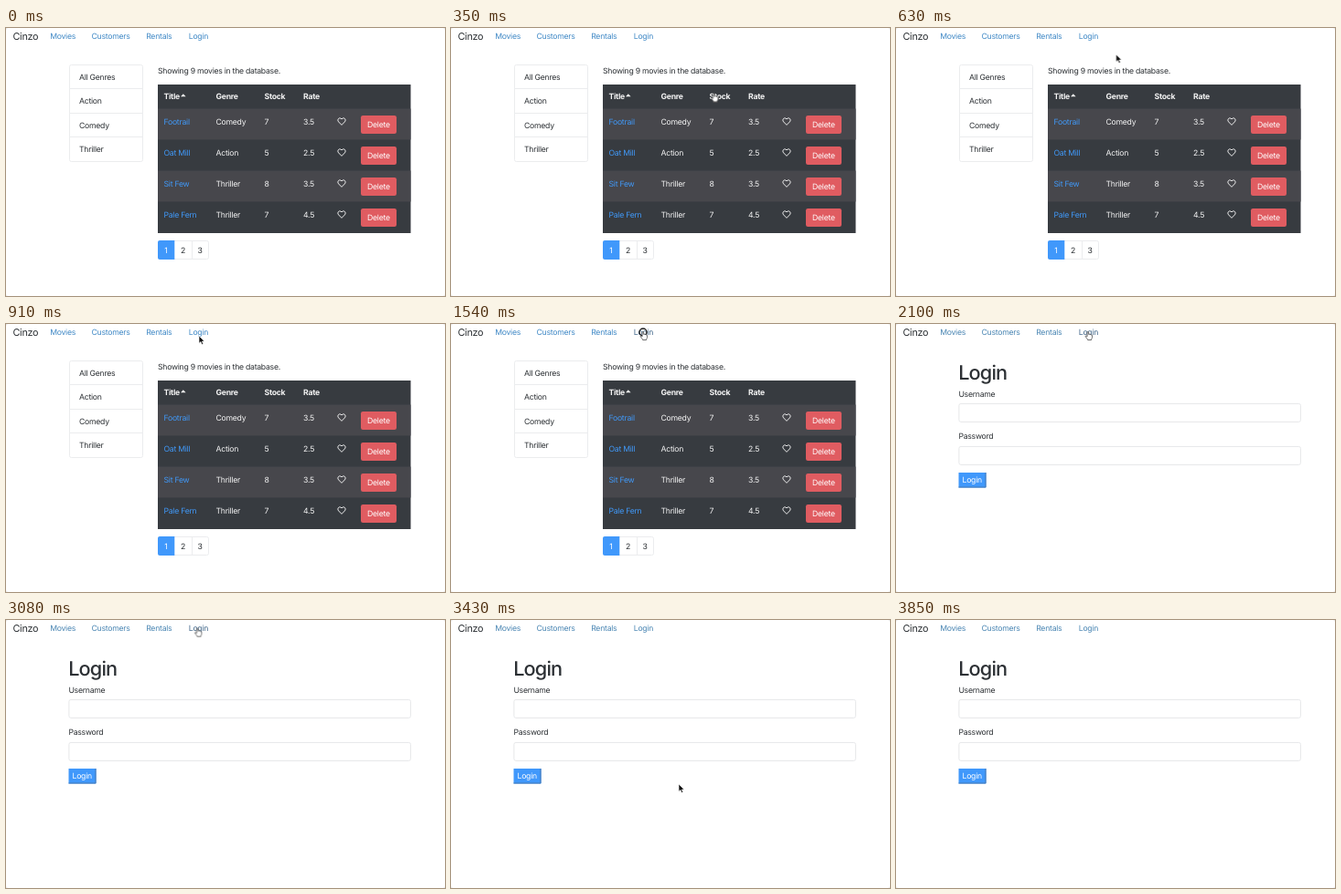
Write an HTML page that moves like this. It is 480x294 px and loops after 4.27 s.

```html
<!DOCTYPE html>
<html lang="en">
<head>
<meta charset="utf-8">
<title>Movie rental login</title>
<style>
  html, body { margin: 0; width: 100%; height: 100%; overflow: hidden; background: #e6e6e6; }
  svg { display: block; width: 480px; height: 294px; }
  text {
    font: 8.67px Inter, "Open Sans", sans-serif;
    letter-spacing: -.03em;
    text-rendering: geometricPrecision;
    fill: #2c3034;
  }
  .brand { font-size: 10.84px; }
  .mid { text-anchor: middle; }
  .table text { fill: #f4f4f4; }
  .table .title { fill: #4099f8; }
  .head text { font-weight: 700; }
  .line { fill: none; stroke: #ebecee; }
  .field { fill: #fff; stroke: #e6e7e9; }
  .h1 { font-size: 21.7px; font-weight: 450; letter-spacing: -.04em; }
  .white, .table .white { fill: #fff; }

  /* The picture advances in 61 ticks of 70 ms. */
  .home, .login, .link, .cursor, .hand, .arrow, .ring { animation: 4270ms step-end infinite; }
  .home { animation-name: home; }
  .login { animation-name: login; }
  .link { animation-name: link; }
  .hover { animation-name: hover; }
  .cursor { animation-name: move; }
  .hand { animation-name: hand; }
  .arrow { animation-name: arrow; }
  .ring { animation-name: ring; fill: none; stroke: #1c1c1c; stroke-width: 1.4; }

  @keyframes home { 0% { opacity: 1 } 49.18%, 100% { opacity: 0 } }
  @keyframes login { 0% { opacity: 0 } 49.18%, 100% { opacity: 1 } }
  @keyframes link { 0% { fill: #4089c6 } 49.18%, 100% { fill: #4a86b3 } }
  @keyframes hover {
    0% { fill: #4089c6 }
    29.508% { fill: #41678a }
    75.409%, 100% { fill: #4a86b3 }
  }
  @keyframes hand {
    0% { opacity: 0 }
    8.196% { opacity: 1 }
    9.836% { opacity: 0 }
    29.508% { opacity: 1 }
    75.409%, 100% { opacity: 0 }
  }
  @keyframes arrow {
    0% { opacity: 1 }
    8.196% { opacity: 0 }
    9.836% { opacity: 1 }
    29.508% { opacity: 0 }
    75.409%, 100% { opacity: 1 }
  }
  @keyframes ring {
    0% { opacity: 0; r: 4px }
    36.065% { opacity: 1; r: 4px; animation-timing-function: steps(7) }
    47.54% { opacity: 1; r: 16.4px }
    49.18%, 100% { opacity: 0; r: 16.4px }
  }
  @keyframes move {
    0% { transform: translate(302px, 400px) }
    1.639% { transform: translate(302px, 240px) }
    3.278% { transform: translate(298px, 188px) }
    4.918% { transform: translate(294px, 140px) }
    6.557% { transform: translate(290px, 100px) }
    8.196% { transform: translate(287.5px, 71.5px); animation-timing-function: steps(3) }
    13.114% { transform: translate(248px, 33px); animation-timing-function: steps(5) }
    21.311% { transform: translate(211px, 13px) }
    29.508% { transform: translate(211px, 10px) }
    31.147% { transform: translate(210px, 8px) }
    72.131% { transform: translate(209.4px, 8.6px) }
    73.77% { transform: translate(211px, 14px) }
    75.409% { transform: translate(215px, 30px) }
    77.049% { transform: translate(224px, 66px) }
    78.688% { transform: translate(236px, 118px) }
    80.327% { transform: translate(249px, 180px) }
    81.967% { transform: translate(260px, 236px) }
    83.606% { transform: translate(268px, 279px) }
    85.245% { transform: translate(271px, 283px) }
    86.885% { transform: translate(275px, 286px) }
    88.524% { transform: translate(281px, 290px) }
    90.163%, 100% { transform: translate(281px, 400px) }
  }
</style>
</head>
<body>
<svg viewBox="0 0 480 294">
  <defs>
    <g id="tools">
      <path d="M367 106.4 L363.6 102.9 C361.5 100.5 364.4 97.1 367 99.9 C369.6 97.1 372.5 100.5 370.4 102.9 Z"
        fill="none" stroke="#f4f4f4" stroke-width=".95" stroke-linejoin="round"/>
      <rect x="388" y="96" width="39" height="20" rx="2.2" fill="#e05c61"/>
      <text class="white mid" x="407.4" y="109.4">Delete</text>
    </g>
  </defs>

  <rect width="480" height="294" rx="2.5" fill="#fff"/>

  <text class="brand" x="7.5" y="12.5">Cinzo</text>
  <text class="link" x="48.2" y="12">Movies</text>
  <text class="link" x="93.5" y="12">Customers</text>
  <text class="link" x="153.2" y="12">Rentals</text>
  <text class="link hover" x="199.8" y="12">Login</text>

  <g class="home">
    <rect class="line" x="69.5" y="40.5" width="80" height="106" rx="2"/>
    <path class="line" d="M69.5 66.5h80M69.5 93.5h80M69.5 119.5h80"/>
    <text x="80" y="57">All Genres</text>
    <text x="80" y="83.4">Action</text>
    <text x="80" y="109.9">Comedy</text>
    <text x="80" y="136.3">Thriller</text>

    <text x="166" y="50">Showing 9 movies in the database.</text>

    <g class="table">
      <rect x="166" y="62" width="276.5" height="163" fill="#373b40"/>
      <path d="M166 88.5h276.5v34h-276.5zM166 156.5h276.5v34h-276.5z" fill="#47474c"/>
      <g class="head">
        <text x="172.5" y="78.4">Title</text>
        <path d="M191 75.2l2.8-3 2.8 3z" fill="#f4f4f4"/>
        <text x="229.5" y="78.4">Genre</text>
        <text x="282.5" y="78.4">Stock</text>
        <text x="325" y="78.4">Rate</text>
      </g>
      <g>
        <text class="title" x="172.5" y="105.5">Footrail</text>
        <text x="229.5" y="105.5">Comedy</text>
        <text x="282.5" y="105.5">7</text>
        <text x="325" y="105.5">3.5</text>
        <use href="#tools"/>
      </g>
      <g transform="translate(0 34)">
        <text class="title" x="172.5" y="105.5">Oat Mill</text>
        <text x="229.5" y="105.5">Action</text>
        <text x="282.5" y="105.5">5</text>
        <text x="325" y="105.5">2.5</text>
        <use href="#tools"/>
      </g>
      <g transform="translate(0 68)">
        <text class="title" x="172.5" y="105.5">Sit Few</text>
        <text x="229.5" y="105.5">Thriller</text>
        <text x="282.5" y="105.5">8</text>
        <text x="325" y="105.5">3.5</text>
        <use href="#tools"/>
      </g>
      <g transform="translate(0 102)">
        <text class="title" x="172.5" y="105.5">Pale Fern</text>
        <text x="229.5" y="105.5">Thriller</text>
        <text x="282.5" y="105.5">7</text>
        <text x="325" y="105.5">4.5</text>
        <use href="#tools"/>
      </g>
    </g>

    <rect class="line" x="166.5" y="233.5" width="55" height="20" rx="2"/>
    <path class="line" d="M203.5 233.5v20"/>
    <path d="M184.3 233v21h-16.2a2.1 2.1 0 0 1-2.1-2.1v-16.8a2.1 2.1 0 0 1 2.1-2.1z" fill="#4098fb"/>
    <text class="white mid" x="175" y="247">1</text>
    <text class="mid" x="193.5" y="247">2</text>
    <text class="mid" x="212" y="247">3</text>
  </g>

  <g class="login">
    <text class="h1" x="68.2" y="61.2">Login</text>
    <text x="68.4" y="80">Username</text>
    <rect class="field" x="68.9" y="87.4" width="373.5" height="20" rx="2"/>
    <text x="68.4" y="126.4">Password</text>
    <rect class="field" x="68.9" y="134.4" width="373.5" height="20" rx="2"/>
    <rect x="68.5" y="163" width="30" height="16.5" fill="#4098fb"/>
    <path d="M68.5 179h29.5v-16" fill="none" stroke="#4579b3"/>
    <text class="white mid" x="83.2" y="174.3">Login</text>
  </g>

  <circle class="ring" cx="210" cy="9" r="4"/>

  <g class="cursor">
    <path class="arrow" d="M0 0v8.2l1.9-1.7 1.3 3 1.5-.7-1.3-2.8h2.6z"
      fill="#111" stroke="#fff" stroke-width=".6"/>
    <path class="hand" d="M-.9 5.8V.9q.8-1.3 1.6 0v2.5q.8-.6 1.3.2.8-.5 1.3.3 1-.4 1.2.6v2.2q-.1 1.2-.9 2v.8H-.4q-.3-1.3-1.2-2.1l-1.2-1.7q0-1.1 1.1-.6z"
      fill="#fff" stroke="#333" stroke-width=".7" stroke-linejoin="round"/>
  </g>
</svg>
</body>
</html>
```
